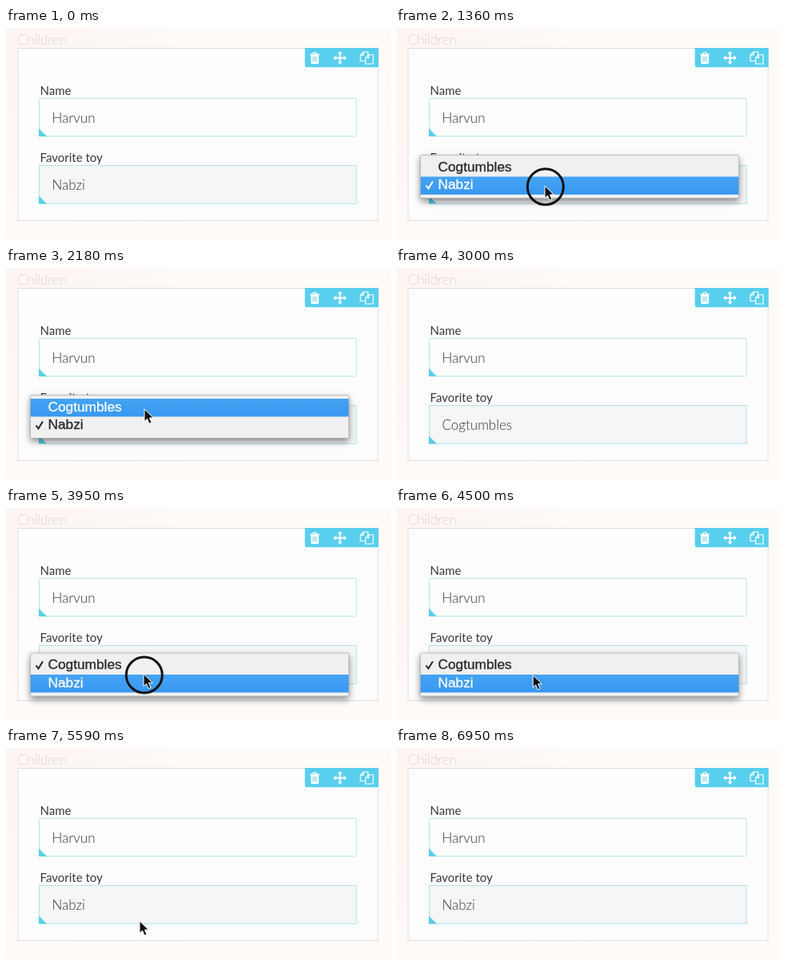
Animation of 480 by 266 pixels, one loop 6990 ms. Source, as an HTML page:

```html
<!DOCTYPE html>
<html lang="en">
<head>
<meta charset="utf-8">
<style>
  html, body { margin: 0; width: 100%; height: 100%; overflow: hidden; }
  svg { display: block; width: 480px; height: 266px; }
  text { font-family: Lato, "Open Sans", sans-serif; fill: #38383a; }
  .label { font-size: 15px; }
  .value { font-size: 17px; font-weight: 300; }
  .title { font-size: 17.3px; font-weight: 100; fill: #7d7775; }
  #menu text { font: 17.3px "Liberation Sans", Arial, sans-serif; fill: #262626; stroke: #262626; stroke-width: .3px; }
  #menu text.on { fill: #fff; stroke: #fff; }
</style>
</head>
<body>
<svg viewBox="0 0 480 266">
  <defs>
    <linearGradient id="page" x2="1" y2=".5">
      <stop stop-color="#fdf5f2"/><stop offset=".4" stop-color="#fefaf7"/><stop offset="1" stop-color="#fefaf6"/>
    </linearGradient>
    <linearGradient id="blue" x2="0" y2="1">
      <stop stop-color="#45a3f4"/><stop offset="1" stop-color="#3898f0"/>
    </linearGradient>
    <filter id="shade" x="-10%" y="-30%" width="120%" height="180%">
      <feDropShadow dx="0" dy="4" stdDeviation="4" flood-color="#000" flood-opacity=".45"/>
    </filter>
  </defs>
  <rect width="480" height="266" fill="url(#page)"/>
  <text class="title" x="14.5" y="20.5">Children</text>
  <rect x="15" y="25.5" width="450" height="216" fill="#fefdfe" stroke="#e2dcd9"/>

  <path d="M373.600 25h92v24.300h-89q-3 0-3-3z" fill="#58cfed"/>
  <!-- bin, move and copy icons -->
  <path d="M380 32.500h3l1-2.500h4l1 2.500h3v1.500h-1v9q0 2-2 2h-6q-2 0-2-2v-9h-1zM384.500 32.500h3l-.5-1.200h-2z" fill="#fff" fill-rule="evenodd"/>
  <path d="M384 35.500v7M386 35.500v7M388 35.500v7" stroke="#58cfed" stroke-width=".8"/>
  <path d="M411 37.500h13M417.500 31v13" stroke="#fff" stroke-width="2"/>
  <path d="M417.500 29l3 3.500h-6zM417.500 46l3-3.500h-6zM409 37.500l3.500-3v6zM426 37.500l-3.500-3v6z" fill="#fff"/>
  <g fill="#58cfed" stroke="#fff" stroke-width="1.200" stroke-linejoin="round">
    <path id="sheet" d="M447 30h5.500v11.500h-9.500v-7.500zM447 30v4h-4"/>
    <use href="#sheet" x="6.500" y="3.500"/>
  </g>

  <text class="label" x="42.500" y="83.500">Name</text>
  <rect x="41.500" y="88.300" width="396.600" height="47.500" rx="2" fill="#fefefe" stroke="#b0e5e7"/>
  <path d="M41 126v10h10z" fill="#58cfed"/>
  <text class="value" x="57.500" y="118.500">Harvun</text>

  <text class="label" x="42.500" y="168">Favorite toy</text>
  <rect x="41.500" y="172.500" width="396.600" height="48" fill="#f6f5f8" stroke="#b0e5e7"/>
  <path d="M41 210.500v10h10z" fill="#58cfed"/>
  <text class="value" id="value" x="57.500" y="203"></text>

  <g id="menu">
    <rect x="30.500" width="398" height="54" rx="1.500" fill="#f0f0f0" stroke="#999" stroke-width=".6" filter="url(#shade)"/>
    <rect id="bar" x="30.700" width="397.600" height="22.500" fill="url(#blue)"/>
    <text x="52.500" y="20"></text>
    <text x="52.500" y="42.500"></text>
    <path id="check" d="M37.500 -5l3 4 5.500-9" fill="none" stroke-width="2"/>
  </g>

  <circle id="ring" fill="none" stroke="#111" stroke-width="3"/>
  <path id="cursor" d="M0 0v15.500l3.500-3.300 2.500 6 3-1.200-2.600-5.900h4.900z" fill="#111" stroke="#fff"/>
</svg>
<script>
const $ = id => document.getElementById(id);
const toys = ["Cogtumbles", "Nabzi"], LOOP = 6990;
const labels = [...document.querySelectorAll("#menu text")];
labels.forEach((label, i) => label.textContent = toys[i]);

// time, x, y of the pointer tip
const path = [
  [880, 194, 268], [1200, 186, 198], [1480, 186, 198], [1980, 173, 177],
  [2620, 173, 177], [2900, 179, 270], [3220, 179, 270], [3660, 172, 208.3],
  [4380, 172, 208.3], [4850, 167, 217], [5880, 167, 217]
];
// opening click, choosing click, menu top, chosen row before opening
const menus = [[1260, 2320, 159.5, 1], [3850, 5200, 182, 0]];
const HOLD = 80, FADE = 200;
const clamp = v => Math.max(0, Math.min(1, v));
const show = (el, alpha) => el.setAttribute("opacity", alpha);

function pointer(t) {
  const i = path.findIndex(p => p[0] > t);
  if (i < 1) return null;
  const [t0, x0, y0] = path[i - 1], [t1, x1, y1] = path[i];
  const u = (t - t0) / (t1 - t0), e = u * u * (3 - 2 * u);
  return [x0 + (x1 - x0) * e, y0 + (y1 - y0) * e];
}

function draw(t) {
  const tip = pointer(t);
  show($("cursor"), tip ? 1 : 0);
  if (tip) $("cursor").setAttribute("transform", `translate(${tip})`);

  const chosen = t >= menus[0][1] + HOLD && t < menus[1][1] + HOLD ? 0 : 1;
  $("value").textContent = toys[chosen];

  const open = menus.find(([a, b]) => t >= a && t < b + HOLD + FADE);
  show($("menu"), open ? 1 - clamp((t - open[1] - HOLD) / FADE) : 0);
  if (open) {
    const [, , top, tick] = open;
    const row = tip[1] > top + 26 ? 1 : 0;
    $("menu").setAttribute("transform", `translate(0 ${top})`);
    $("bar").setAttribute("y", 4.5 + row * 22.5);
    labels.forEach((label, i) => label.classList.toggle("on", i === row));
    $("check").setAttribute("transform", `translate(0 ${20.5 + tick * 22.5})`);
    $("check").setAttribute("stroke", tick === row ? "#fff" : "#262626");
  }

  const click = menus.flatMap(m => m.slice(0, 2)).find(c => t >= c && t < c + 260);
  show($("ring"), click ? 1 - clamp((t - click - 160) / 100) : 0);
  if (click) {
    $("ring").setAttribute("cx", tip[0] + .8);
    $("ring").setAttribute("cy", tip[1] + 1.2);
    $("ring").setAttribute("r", 10 + 12.5 * clamp((t - click) / 90));
  }
}

const start = performance.now();
function tick() {
  draw((performance.now() - start) % LOOP);
  requestAnimationFrame(tick);
}
tick();
</script>
</body>
</html>
```
